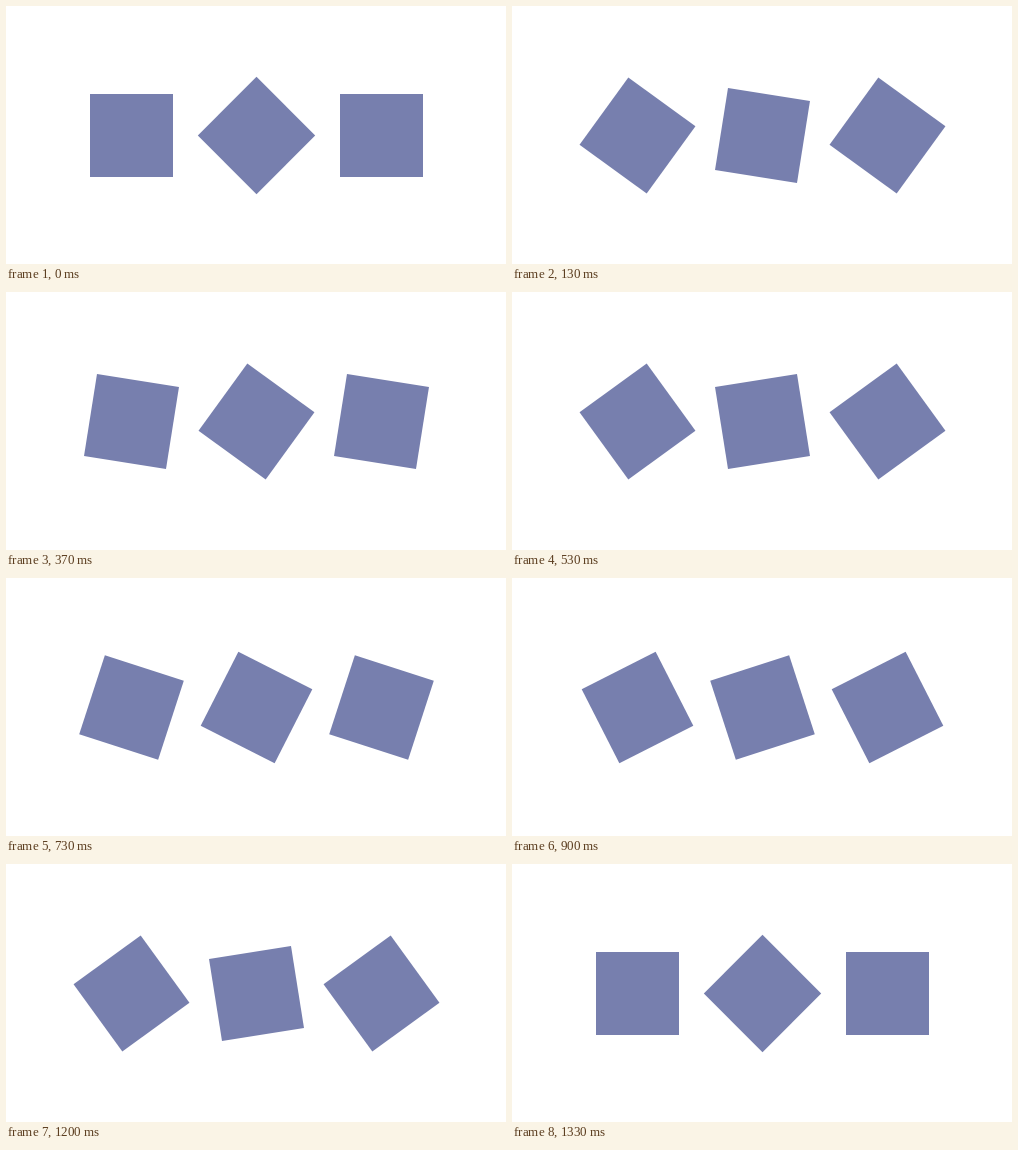
Animation, 500 px wide and 258 px high, one loop 1370 ms. Source, as an HTML page:

```html
<!DOCTYPE html>
<html lang="en">
<head>
<meta charset="utf-8">
<title>Turning squares</title>
<style>
  html, body { margin: 0; width: 100%; height: 100%; overflow: hidden; background: #fff; }
  svg { display: block; width: 500px; height: 258px; }
  rect {
    fill: #777fae;
    shape-rendering: crispEdges;
    transform-box: fill-box;
    transform-origin: center;
  }
</style>
</head>
<body>
<svg viewBox="0 0 500 258">
  <rect x="84" y="88" width="83" height="83"/>
  <rect x="209" y="88" width="83" height="83"/>
  <rect x="334" y="88" width="83" height="83"/>
</svg>
<script>
  const LOOP = 1370;
  const STEPS = 40; // one full turn, 9 degrees per step

  // Steps run at 30 per second, rounded to 10 ms; the last pose holds to the loop's end.
  const stepTime = k => Math.round(k * 10 / 3) * 10;

  function spin(el, start, dir) {
    const keys = Array.from({ length: STEPS + 2 }, (_, k) => ({
      offset: stepTime(k) / LOOP,
      transform: `rotate(${start + dir * 360 / STEPS * Math.min(k, STEPS)}deg)`,
      easing: 'step-end'
    }));
    el.animate(keys, { duration: LOOP, iterations: Infinity });
  }

  const [left, middle, right] = document.querySelectorAll('rect');
  spin(left, 0, 1);
  spin(middle, 45, -1);
  spin(right, 0, 1);
</script>
</body>
</html>
```
